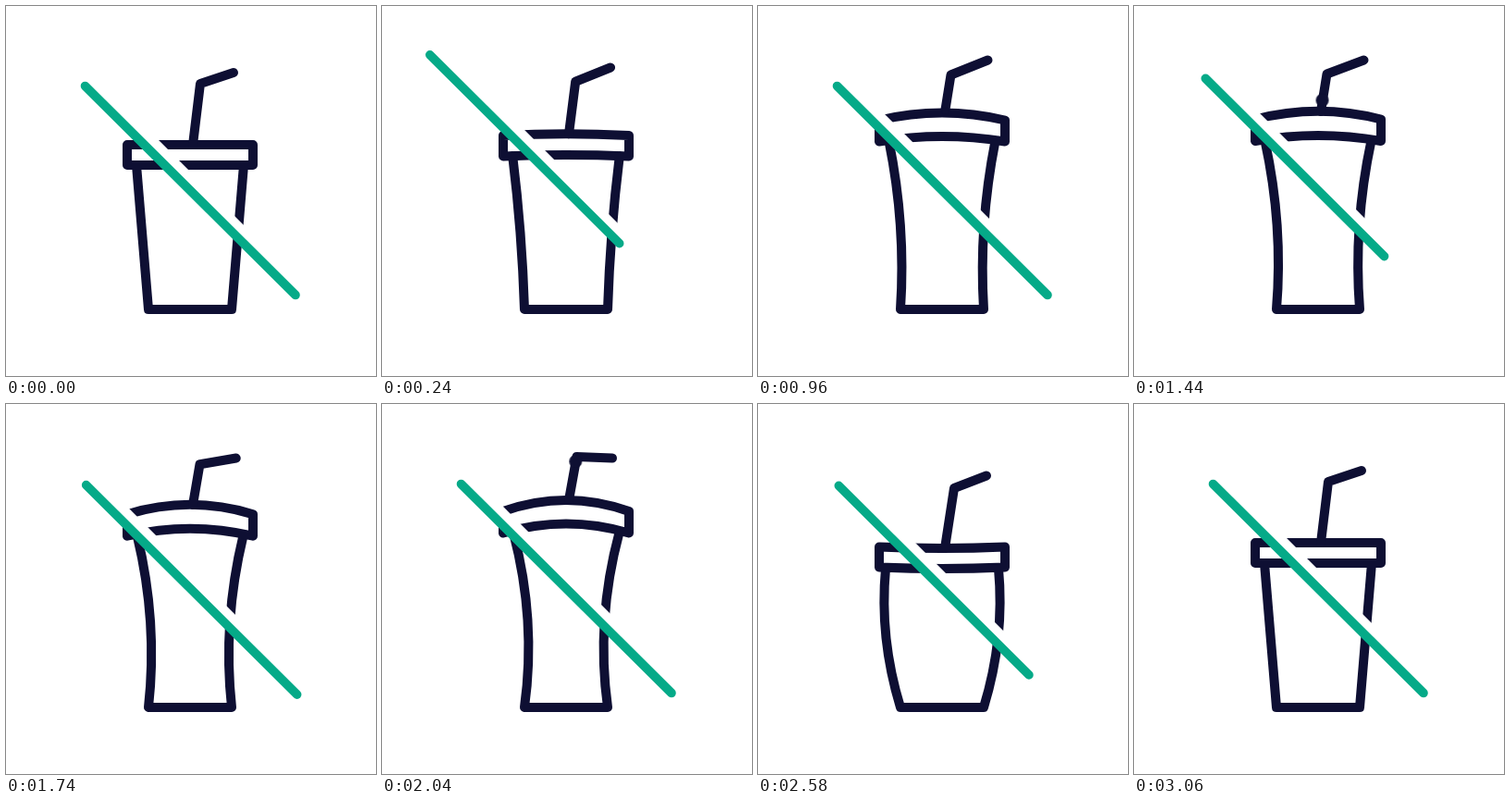
Write an HTML page without scripts that moves like this. It is 400 px wide and 400 px high and loops after 3.09 s.

```html
<!DOCTYPE html>
<html lang="en">
<head>
<meta charset="utf-8">
<title>No takeaway cups</title>
<style>
html, body { margin: 0; width: 100%; height: 100%; overflow: hidden; background: #fff; }
svg { display: block; width: 100vw; height: 100vh; }

.cup path {
  fill: none;
  stroke: #0e0f33;
  stroke-width: 10;
  stroke-linecap: round;
  stroke-linejoin: round;
}
.cup path, .slash { animation: 3090ms ease-in-out infinite; }
.cup .lid { animation-name: lid; }
.cup .body { animation-name: body; }
.cup .straw { animation-name: straw; }

.gap { stroke: #fff; stroke-width: 15; }
.slash {
  fill: none;
  stroke: #05aa88;
  stroke-width: 9.6;
  stroke-linecap: round;
  animation-name: slash;
}

.bead {
  fill: #0e0f33;
  opacity: 0;
  animation: sip 3090ms linear infinite;
  animation-delay: calc(var(--start) - 3090ms);
}

/* The drink pulls the lid up, then the cup drops, bulges and settles. */
@keyframes lid {
  0%, 95.5%, 100% { d: path("M131 150Q199 150 267 150L267 172Q199 172 131 172Z"); }
  17.48% { d: path("M131 125.5Q199 116.5 267 125.5L267 148.5Q199 141.5 131 148.5Z"); }
  31.07% { d: path("M131 123.5Q199 107.5 267 123.5L267 146.5Q199 135.5 131 146.5Z"); }
  46.6% { d: path("M131 122.5Q199 105 267 122.5L267 146Q199 134 131 146Z"); }
  66.02% { d: path("M131 116Q199 92 267 116L267 139.5Q199 119.5 131 139.5Z"); }
  70.5% { d: path("M131 114Q199 86 267 114L267 137.5Q199 114 131 137.5Z"); }
  83.5% { d: path("M131 154.5Q199 157.5 267 154.5L267 176.5Q199 179.5 131 176.5Z"); }
}
@keyframes body {
  0%, 95.5%, 100% { d: path("M141 172Q147.5 250 154 328L244 328Q250.5 250 257 172"); }
  17.48% { d: path("M141.5 148Q157 238 154 328L244 328Q241 238 256.5 148"); }
  31.07% { d: path("M141.5 146Q160 237 154 328L244 328Q238.5 237 256.5 146"); }
  46.6% { d: path("M141.5 145.5Q161.5 237 154 328L244 328Q237 237 256.5 145.5"); }
  66.02% { d: path("M142 139Q167 234 154 328L244 328Q231 234 256.5 139"); }
  70.5% { d: path("M142 137Q169 233 154 328L244 328Q229 233 256.5 137"); }
  83.5% { d: path("M138 178Q131 253 154 328L244 328Q267 253 260 178"); }
}
@keyframes straw {
  0%, 95.5%, 100% { d: path("M202 150L210 84L246 72"); }
  17.48% { d: path("M202 121L208 78.5L248.5 58.5"); }
  31.07% { d: path("M202 115L208.5 74.5L248.5 58.5"); }
  46.6% { d: path("M202 114L208.5 73.5L248.5 58.5"); }
  66.02% { d: path("M202 104L210.5 57L249 58.5"); }
  70.5% { d: path("M202 100L211 53L249 58.5"); }
  83.5% { d: path("M202 156L212 91L247 77.5"); }
}

/* Wind up, strike past the end, rebound and rest; three strikes per loop. */
@keyframes slash {
  0%, 35.6%, 71.2%, 100% { d: path("M85.5 86.5L313 312.5"); }
  7.12%, 42.72%, 78.32% {
    d: path("M50.5 51.5L256 256");
    animation-timing-function: ease-in;
  }
  11%, 46.6%, 82.2% {
    d: path("M77 78L270 270");
    animation-timing-function: linear;
  }
  12.3%, 47.9%, 83.5% {
    d: path("M87 88L292 292");
    animation-timing-function: ease-out;
  }
  14.24%, 49.84%, 85.44% {
    d: path("M100 101L331 330.5");
    animation-timing-function: ease-in;
  }
  16.18%, 51.78%, 87.38% {
    d: path("M92 93L322 322");
    animation-timing-function: ease-out;
  }
  17.48%, 53.07%, 88.67% { d: path("M77 78L305 304"); }
  22%, 57.6%, 93.2% { d: path("M88.5 89.5L316.5 316"); }
  27.18%, 62.78%, 98.38% { d: path("M85.5 86.5L313 312.5"); }
}

/* A gulp rises from the lid to the bend and out along the tip. */
@keyframes sip {
  0% { opacity: 1; transform: translate(0, 0) scale(.5); }
  1.46% { opacity: 1; transform: translate(1.5px, -13px) scale(1); }
  4.85% { opacity: 1; transform: translate(7px, -42px) scale(1); }
  9.7% { opacity: 1; transform: translate(46px, var(--tip)) scale(.6); }
  9.71%, 100% { opacity: 0; transform: translate(46px, var(--tip)) scale(.6); }
}
</style>
</head>
<body>
<svg viewBox="0 0 400 400" role="img" aria-label="Crossed-out drinking cup with a straw">
  <g class="cup">
    <path class="body" d="M141 172Q147.5 250 154 328L244 328Q250.5 250 257 172"/>
    <path class="lid" d="M131 150Q199 150 267 150L267 172Q199 172 131 172Z"/>
    <path class="straw" d="M202 150L210 84L246 72"/>
  </g>
  <g transform="translate(202 120)"><circle class="bead" r="7" style="--start:495ms;--tip:-61px"/></g>
  <g transform="translate(202 115)"><circle class="bead" r="7" style="--start:955ms;--tip:-56px"/></g>
  <g transform="translate(202 115)"><circle class="bead" r="7" style="--start:1395ms;--tip:-56px"/></g>
  <g transform="translate(202 104)"><circle class="bead" r="7" style="--start:1890ms;--tip:-46px"/></g>
  <path class="gap" d="M59.5 50L319.5 310"/>
  <path class="slash" d="M85.5 86.5L313 312.5"/>
</svg>
</body>
</html>
```
